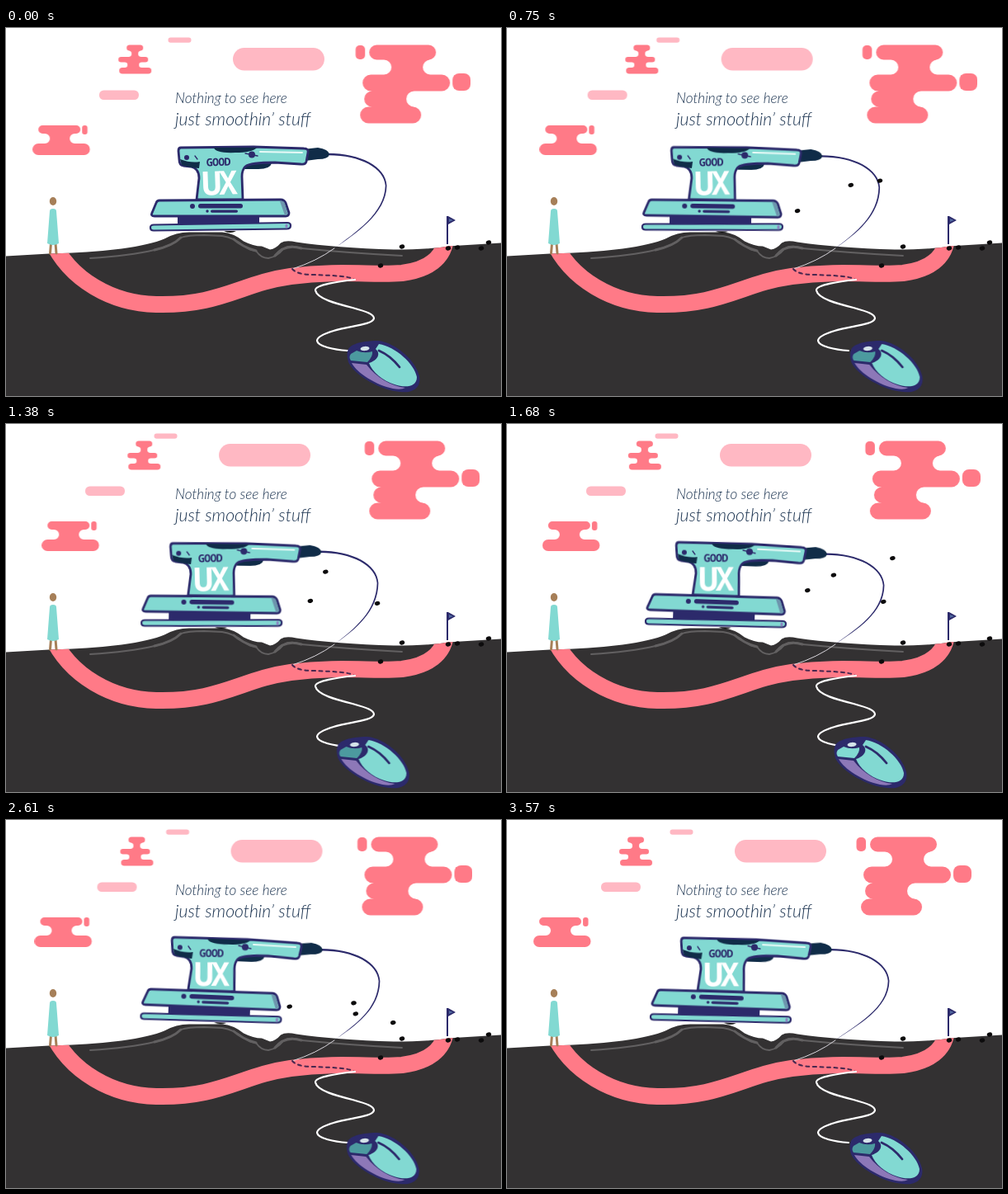
Animation, 600 px wide and 446 px high, one loop 3600 ms. Source, as an HTML page:

```html
<!DOCTYPE html>
<html lang="en">
<head>
<meta charset="utf-8">
<title>Smoothing</title>
<style>
html, body { margin: 0; width: 100%; height: 100%; overflow: hidden; background: #fff; }
svg { display: block; width: 600px; height: 446px; }
.line { fill: none; stroke-linecap: round; stroke-linejoin: round; }
.navy { fill: #2c2a6b; }
.dark { fill: #102c48; }
.ink { stroke: #2c2a6b; stroke-width: 2.8; stroke-linejoin: round; }
.teal { fill: #82d9d2; }
.pink { fill: #ff7a87; }
.pale { fill: #ffb8c3; }
.head { font: italic 300 17.2px Lato, sans-serif; fill: #1b3350; }
.brand { font-family: "Noto Sans Mono", monospace; text-anchor: middle; }

#clouds { animation: drift 1.8s -350ms cubic-bezier(.37, 0, .63, 1) infinite alternate; }
#pills { animation: float 3.6s infinite; }
#sander { transform-origin: 260px 240px; animation: rub 3.6s ease-in-out infinite; }
#mouse { animation: nudge 3.6s cubic-bezier(.37, 0, .63, 1) infinite; }
#button { animation: press 3.6s step-end infinite; }

@keyframes drift {
  from { transform: translateX(-.9px); }
  to { transform: translateX(11.3px); }
}
@keyframes float {
  0% { transform: none; animation-timing-function: cubic-bezier(.25, 1, .5, 1); }
  47% { transform: translateX(-17px); animation-timing-function: cubic-bezier(.39, .575, .565, 1); }
  92%, 100% { transform: translateX(1px); }
}
@keyframes rub {
  0% { transform: none; }
  10.8% { transform: translate(-8px, 0) rotate(2deg); }
  30.8% { transform: translate(-14px, .5px) rotate(-.3deg); }
  46.7% { transform: translate(-7px, 0) rotate(2deg); }
  62.5% { transform: translate(-12.5px, 2.6px) rotate(-2.9deg); }
  72.5% { transform: translate(-11.5px, -1px) rotate(2.3deg); }
  99%, 100% { transform: translate(-1px, -.5px) rotate(2deg); }
}
@keyframes nudge {
  0% { transform: none; }
  10%, 19.4% { transform: translateX(2.5px); }
  47.2% { transform: translateX(-17px); }
  80.6%, 100% { transform: translateX(2px); }
}
@keyframes press {
  0% { fill: #4c9a9f; }
  39% { fill: #82d9d2; }
  67.5%, 100% { fill: #4c9a9f; }
}
</style>
</head>
<body>
<svg viewBox="0 0 600 446">
  <defs>
    <path id="land" transform="translate(0 1.5)" d="M0 275 L52 272 Q100 271 140 266 Q175 261 192 254 Q206 246 222 246 L262 246 Q276 247 288 257 Q300 263 310 263 L320 267 Q327 266 333 259 Q339 255 352 258 Q400 265 470 267 Q515 267 535 263 L600 259 V446 H0 Z"/>
    <clipPath id="ground"><use href="#land"/></clipPath>
  </defs>

  <g id="pills" class="pale">
    <rect x="275" y="24" width="111" height="27.5" rx="13.7"/>
    <rect x="196.5" y="11.5" width="28" height="6.2" rx="3"/>
    <rect x="113" y="75.5" width="48" height="11.5" rx="5.5"/>
  </g>
  <g id="clouds" class="pink">
    <rect x="92" y="118" width="6.5" height="11" rx="3"/>
    <rect x="423.5" y="21" width="11.5" height="17" rx="5"/>
    <rect x="541" y="55" width="22" height="21" rx="8"/>
  </g>

  <text class="head" x="205" y="91">Nothing to see here</text>
  <text class="head" x="205" y="118" style="font-size:21.2px">just smoothin’ stuff</text>

  <use href="#land" fill="#333132"/>
  <g class="line" stroke="#626061">
    <path stroke-width="1.8" d="M102 279 Q150 276 180 269 Q202 264 212 254 Q220 251 240 251 L262 252 Q276 254 288 264 Q296 270 303 270 Q309 279 318 279 Q329 277 336 268 Q343 262 358 267 Q420 273 480 276"/>
    <path stroke-width="3" d="M180 269 Q202 264 212 254 M276 256 Q286 265 303 270 M326 276 Q338 261 358 267"/>
  </g>
  <g clip-path="url(#ground)">
    <path class="line" d="M55 256 C77 306 130 334 182 335 C260 337 286 309 345 301 C405 293 445 300 480 297 C512 293 530 279 533 256" stroke="#ff7a87" stroke-width="20"/>
  </g>

  <path class="line" d="M398 267 Q376 283 347 292" stroke="#d9d6dc"/>
  <path class="line" d="M347 292 Q353 299 372 299 C400 300 418 301 422 305" stroke="#48274f" stroke-width="2" stroke-dasharray="4 4.5"/>
  <path class="line" stroke="#fff" stroke-width="2.2" d="M423 305 C405 307 374 311 375 318 C377 328 400 334 420 339 C438 344 446 347 446 352 C444 360 415 361 397 367 C384 371 377 375 377 379 C378 386 398 390 414 391"/>

  <path class="line" d="M54.5 261 L53.5 273 M60 261 L61 273" stroke="#a67f58" stroke-width="3"/>
  <path class="teal" d="M53 222 Q53 219 57 219 Q61 219 61 222 L64 261 Q57 265 50 261 Z"/>
  <ellipse cx="57" cy="210" rx="4.2" ry="5" fill="#a67f58"/>

  <path class="navy" d="M534 228 h2 v34 h-2 Z M536 228 L545 233 L536 238 Z"/>
  <path d="M537 231 L542 233 L537 235 Z" fill="#5269a0"/>
  <g id="rocks" fill="#0c0b0c"></g>

  <path id="cable" class="navy"/>

  <g id="sander">
    <path class="dark" d="M362 147 L369 146 L378 145 Q391 147 392 153 Q391 159 378 159 L363 161 Z"/>
    <circle id="plug" class="dark" cx="390" cy="153" r="1.5"/>
    <path class="dark" d="M286 164 H322 Q320 171 306 171 H286 Z"/>
    <path class="teal ink" d="M212 145 L300 144 L361 146 Q367 146 366 151 L364 162 Q363 166 357 165 L326 163 Q296 163 290 168 Q286 172 286 180 L287 208 H231 L234 182 Q234 170 224 168 L215 167 Q210 166 210 160 L209 149 Q209 145 212 145 Z"/>
    <path class="dark" d="M252 145 L304 145 Q298 151 278 151 Q254 152 252 145 Z M211 159 Q224 164 235 162 L234 170 Q222 169 213 166 Z"/>
    <path class="line" d="M308 150 L359 151" stroke="#e7faf7" stroke-width="2"/>
    <path class="line ink" d="M290 152 L305 155 M229 155 L232 159" style="stroke-width:1.3"/>
    <circle class="navy" cx="219" cy="157" r="3"/>
    <circle class="navy" cx="298" cy="153.5" r="4"/>
    <g transform="rotate(-2 258 180)">
      <text class="brand navy" x="258" y="167" font-size="13" font-weight="700" letter-spacing="-.5">GOOD</text>
      <text class="brand" x="257" y="202" font-size="40" font-weight="600" letter-spacing="-4" fill="#fff">UX</text>
    </g>

    <rect class="navy" x="208" y="228" width="99" height="13"/>
    <path class="teal ink" d="M186 209 L333 208 Q337 208 339 212 L343 224 Q343 228 339 228 L180 228 Q175 228 177 224 L182 212 Q183 209 186 209 Z"/>
    <path d="M332 210 Q337 209 338 213 L341 224 Q341 227 338 227 Z" fill="#6d95ad"/>
    <g class="navy">
      <circle cx="226" cy="216" r="3"/><rect x="233" y="213" width="54" height="5.5" rx="2.7"/>
      <circle cx="244" cy="222" r="1.7"/><rect x="248" y="220.5" width="33" height="3.2" rx="1.6"/>
    </g>
    <path class="teal ink" d="M179 238.500 L341 236 Q345 236 345 239.500 Q345 243.500 340 243.500 L179 245.500 Q175 245.500 175 242 Q175 238.500 179 238.500 Z" style="stroke-width:2.200"/>
    <path class="line" d="M340 239 V241" stroke="#8a86c2" stroke-width="3"/>
    <path d="M264 246 Q272 250 279 246 Z" fill="#111"/>
  </g>

  <g id="flying" fill="#0c0b0c"></g>

  <g id="mouse">
    <path class="navy" d="M415 389 C420 381 438 379 451 379 C472 381 497 403 501 422 C504 437 491 443 478 441 C456 440 422 421 415 405 Q412 395 415 389 Z"/>
    <path d="M419 406 L437 408 C449 424 467 434 484 436 Q479 439 469 437 C449 433 425 418 419 406 Z" fill="#8d78b8"/>
    <path class="teal" d="M452 383 C472 386 495 407 498 423 C498 436 483 436 471 432 C456 427 444 417 440 406 C450 403 455 395 448 389 Z"/>
    <path id="button" d="M418 395 L425 391 Q434 395 444 392 Q445 398 438 405 L418 403 Q415 399 418 395 Z"/>
    <ellipse cx="435" cy="388.5" rx="5.5" ry="2.6" fill="#d5e4ea" transform="rotate(-5 435 388)"/>
    <path class="line ink" d="M452 391 Q466 397 477 411"/>
  </g>
</svg>
<script>
const LOOP = 3600, GRAVITY = 989, GRAINS = 16;
const $ = id => document.getElementById(id);

function add(parent, tag, attrs) {
  const el = document.createElementNS('http://www.w3.org/2000/svg', tag);
  for (const k in attrs) el.setAttribute(k, attrs[k]);
  return $(parent).appendChild(el);
}

// Stacked bars [left, right, height] with round ends; a row set well inside both neighbours is a notch.
function cloud(top, rows) {
  const last = rows.length - 1;
  const side = (i, k, dir) => {
    const r = rows[i][2] / 2, inset = j => dir * (rows[j][k] - rows[i][k]) > r;
    const notch = i > 0 && i < last && inset(i - 1) && inset(i + 1);
    return { r, sweep: notch ? 0 : 1, x: rows[i][k] + dir * (notch ? r : -r) };
  };
  const arc = ({ r, sweep, x }, y0, y1) => `L${x} ${y0}A${r} ${r} 0 0 ${sweep} ${x} ${y1}`;
  let right = '', left = '', y = top;
  rows.forEach((row, i) => {
    const next = y + row[2];
    right += arc(side(i, 1, 1), y, next);
    left = arc(side(i, 0, -1), next, y) + left;
    y = next;
  });
  add('clouds', 'path', { d: 'M' + (right + left).slice(1) + 'Z' });
}
cloud(118, [[39, 90, 10], [53, 77, 12], [32, 101.5, 14]]);
cloud(20.5, [[146, 166, 7], [152, 160, 7.5], [136, 172, 6.5], [147, 161, 6.5], [137, 176, 7.5]]);
cloud(20.5, [[440, 521, 18], [467, 505, 18], [432, 538, 20], [434, 485, 19], [429, 503, 20]]);

const place = (el, x, y) => el.setAttribute('transform', `translate(${x} ${y}) rotate(-15)`);
const rock = parent => add(parent, 'ellipse', { rx: 3.3, ry: 2.5 });
[[480, 265], [536, 267], [547, 266], [576, 267], [585, 260], [454, 288]]
  .forEach(([x, y]) => place(rock('rocks'), x, y));

let seed = 11;
const random = (a, b) => {
  seed = seed * 16807 % 2147483647;
  return a + (b - a) * seed / 2147483647;
};

// Grit thrown from the right edge of the plate, all of it landed before the loop ends.
const grit = Array.from({ length: GRAINS }, (_, i) => ({
  at: 320 + 2450 * i / GRAINS + random(0, 120),
  vx: random(240, 310),
  vy: random(-420, -150),
  el: rock('flying')
}));

function drawGrit(t) {
  for (const g of grit) {
    const s = (t - g.at) / 1000;
    const x = 335 + g.vx * s, y = 238 + g.vy * s + GRAVITY * s * s / 2;
    const shown = s >= 0 && y < 267 && x < 588;
    g.el.setAttribute('visibility', shown ? 'visible' : 'hidden');
    if (shown) place(g.el, x, y);
  }
}

// Tapered cord from the moving plug to a fixed point on the ground.
function drawCable() {
  const box = $('plug').getBoundingClientRect();
  const x = box.x + box.width / 2, y = box.y + box.height / 2;
  const p = (dx, dy) => `${x + dx} ${y + dy}`;
  $('cable').setAttribute('d',
    `M${p(0, -1.2)}C${p(40, -1)} ${p(70.5, 15)} ${p(71.5, 38)}C${p(71, 72)} 424 249 398 267` +
    `C423 248 ${p(69, 72)} ${p(69.8, 38)}C${p(68.5, 17)} ${p(40, 1)} ${p(0, 1.2)}Z`);
}

const start = performance.now();
function tick() {
  drawGrit((performance.now() - start) % LOOP);
  drawCable();
  requestAnimationFrame(tick);
}
tick();
</script>
</body>
</html>
```
